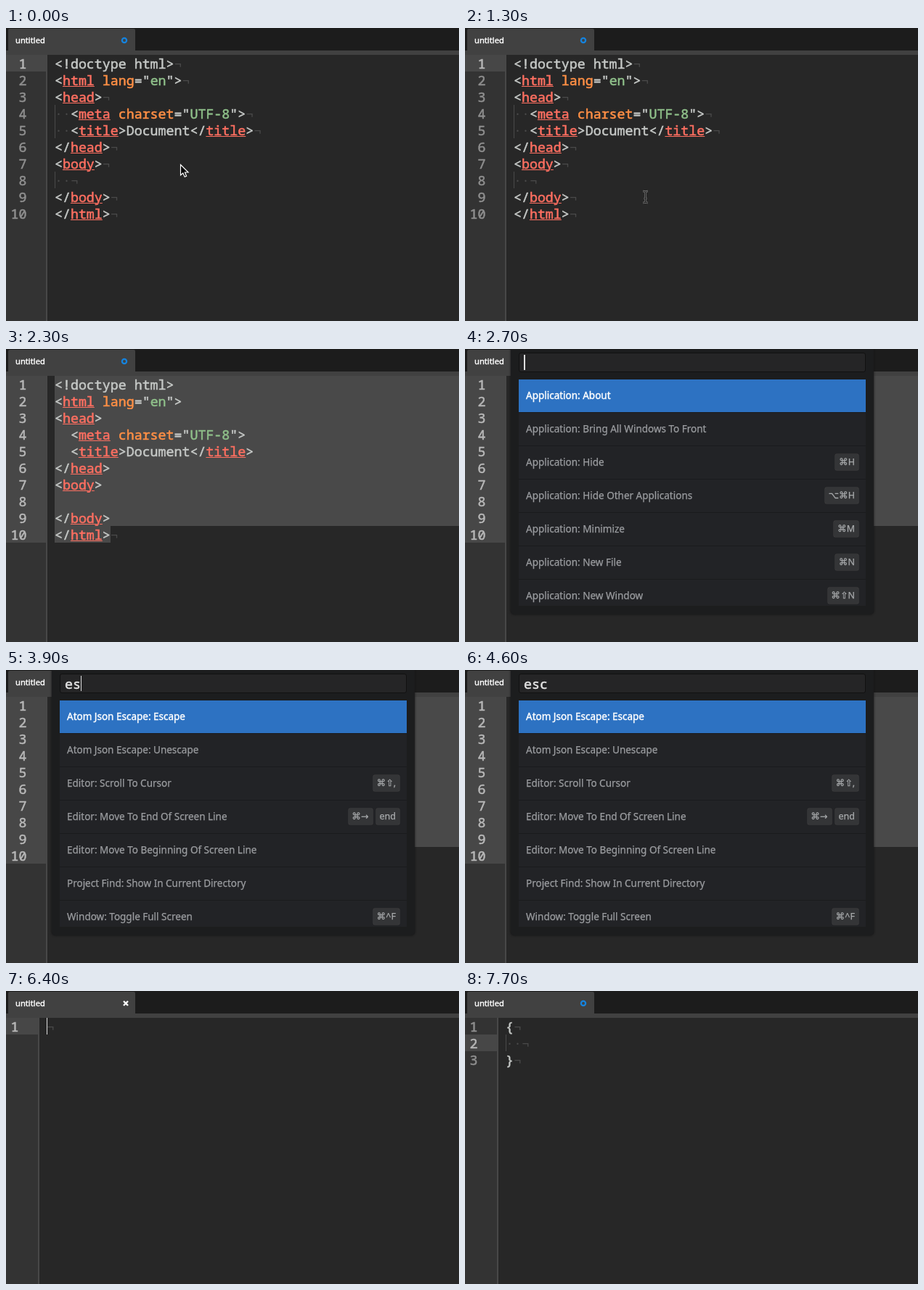
These frames come from a looping animation (624 by 404 pixels, 8 s). An HTML page:

```html
<!DOCTYPE html>
<html lang="en">
<head>
<meta charset="UTF-8">
<title>Editor</title>
<style>
html, body { margin: 0; width: 100%; height: 100%; overflow: hidden; }
#stage { position: relative; width: 624px; height: 404px; overflow: hidden; background: #272727;
  color: #c5c8c6; font: 18.3px/23px "Noto Sans Mono", monospace; -webkit-text-stroke: .55px; white-space: pre; }
#stage div, #stage svg { position: absolute; box-sizing: border-box; }
.bar { width: 624px; height: 37px; background: #1c1c1c; border-bottom: 6px solid #414141; }
.tab { left: 3px; top: 1px; width: 175px; height: 31px; border-radius: 2px 2px 0 0; background: #414141;
  color: #fff; font: 11.2px/31px "Noto Sans", sans-serif; -webkit-text-stroke: .4px; padding-left: 10px; }
.gutter { left: 0; top: 37px; bottom: 0; background: #333; border-right: 2px solid #484848; color: #8f8f8f; }
.num { left: 0; right: 0; height: 23px; padding-right: 26.5px; text-align: right; }
.active { background: #474747; color: #b8b8b8; }
.lines { top: 37px; right: 0; bottom: 0; }
.row { left: 0; right: 0; height: 23px; }
.sel { background: #494949; }
.row span { display: inline-block; height: 23px; }
.hint { color: #4a4a4a; -webkit-text-stroke: 0; }
.guide { border-left: 1px solid #4a4a4a; height: 23px; }
.caret { width: 1px; height: 23px; background: #ddd; }
b, i { font-weight: 400; font-style: normal; }
b { color: #fd6f61; text-decoration: underline 1.3px; text-underline-offset: 1px; }
.attr { color: #ff8f45; }
.str { color: #8fc08a; }
.thumb { left: 412px; top: 399px; width: 212px; height: 5px; border-radius: 3px 0 0 0; background: #686868; }
.palette { left: 63px; top: -10px; width: 500px; height: 376px; border-radius: 5px; background: #1c1d1e;
  box-shadow: 0 0 3px #111; }
.input { left: 11px; top: 15px; width: 478px; height: 27px; border: 1px solid #111; border-radius: 3px;
  background: #252526; color: #e4e4e4; padding-left: 6px; line-height: 26px; }
.input .caret { top: 2px; height: 21px; width: 1.5px; margin-left: 6px; }
.list { left: 11px; top: 52px; width: 478px; height: 312px; overflow: hidden; background: #222326;
  color: #9b9da0; font: 13.5px/45px "Noto Sans", sans-serif; -webkit-text-stroke: .25px; }
.item { left: 0; width: 478px; height: 46px; padding-left: 10px; border-bottom: 1px solid #1a1b1d; }
.item:first-child { background: #2d72c2; color: #fff; -webkit-text-stroke: .4px; }
.keys { right: 10px; top: 11px; display: flex; gap: 5px; }
kbd { height: 22px; padding: 0 5px; border-radius: 2px; background: #343537; color: #a9abad;
  box-shadow: 0 0 0 .5px #444; font: 12.5px/22px "Noto Sans", "DejaVu Sans", sans-serif; }
</style>
</head>
<body>
<div id="stage"></div>
<script>
const stage = document.getElementById("stage");
const LOOP = 8000;
const page = ["<!doctype html>", '<html lang="en">', "<head>", '  <meta charset="UTF-8">',
  "  <title>Document</title>", "</head>", "<body>", "  ", "</body>", "</html>"];
const escaped = page.join("\\n").replace(/"/g, '\\"');

// Each command is a title, followed by its key bindings.
const allCommands = [["Application: About"], ["Application: Bring All Windows To Front"],
  ["Application: Hide", "⌘H"], ["Application: Hide Other Applications", "⌥⌘H"],
  ["Application: Minimize", "⌘M"], ["Application: New File", "⌘N"], ["Application: New Window", "⌘⇧N"]];
const foundCommands = [["Atom Json Escape: Escape"], ["Atom Json Escape: Unescape"],
  ["Editor: Scroll To Cursor", "⌘⇧,"], ["Editor: Move To End Of Screen Line", "⌘→", "end"],
  ["Editor: Move To Beginning Of Screen Line"], ["Project Find: Show In Current Directory"],
  ["Window: Toggle Full Screen", "⌘^F"]];

const within = (t, ...spans) => spans.some(([from, to]) => t >= from && t < to);
const div = (cls, body = "", style = "") => `<div class="${cls}" style="${style}">${body}</div>`;
const caret = col => div("caret", "", `left:${col}ch`);
const hint = text => `<i class="hint">${text}</i>`;

function highlight(text) {
  return text.replace(/(<\/?)([a-z]+)|([a-z]+)(?==)|"([^"\\]+)(\\?")|</g,
    (all, open, tag, attr, str, close) =>
      tag ? open.replace("<", "&lt;") + `<b>${tag}</b>` :
      attr ? `<i class="attr">${attr}</i>` :
      str ? `"<i class="str">${str}</i>${close}` : "&lt;");
}

function row(text, index, selected, last) {
  const top = `top:${index * 23}px`;
  if (selected) {
    const code = highlight(text);
    return last ? div("row", `<span class="sel">${code}</span>${hint("¬")}`, top) : div("row sel", code, top);
  }
  const indent = text.match(/^ */)[0].length;
  const guide = indent ? div("guide") : "";
  return div("row", guide + hint("·".repeat(indent)) + highlight(text.slice(indent)) + hint("¬"), top);
}

function editor({ lines, current = 0, selected = false, caretAt = -1, scrolled = false }) {
  const edge = lines.length > 9 ? 57 : 46;
  const numbers = lines.map((_, i) =>
    div("num" + (selected || i === current ? " active" : ""), i + 1, `top:${i * 23}px`)).join("");
  const rows = scrolled
    ? div("row", `<span class="sel">${highlight(lines[0])}</span>${hint("¬")}`, "left:auto;right:5px")
    : lines.map((line, i) => row(line, i, selected, i === lines.length - 1)).join("");
  const cursor = caretAt < 0 ? "" : div("row", caret(caretAt), `top:${current * 23}px`);
  return div("lines", rows + cursor, `left:${edge + 10}px`) + div("gutter", numbers, `width:${edge}px`);
}

function tabBar(modified) {
  const icon = modified
    ? '<circle cx="163" cy="17" r="3.1" fill="none" stroke="#1583de" stroke-width="2.3"/>'
    : '<path d="M162 14l6 6m0-6l-6 6" stroke="#fff" stroke-width="2.4"/>';
  return div("bar") + div("tab", "untitled") + `<svg width="180" height="37">${icon}</svg>`;
}

function palette(query, commands, caretOn) {
  const items = commands.map(([title, ...keys], i) =>
    div("item", title + div("keys", keys.map(key => `<kbd>${key}</kbd>`).join("")), `top:${i * 46}px`));
  return div("palette",
    div("input", query + (caretOn ? caret(query.length) : "")) + div("list", items.join("")));
}

// Stops are [time, x, y], joined by eased moves.
const path = [[0, 240, 188], [100, 240, 188], [500, 221, 186], [700, 221, 186],
  [800, 218, 182], [1000, 218, 182], [1300, 248.5, 233], [1600, 248.5, 233]];

function pointer(t) {
  const next = path.findIndex(stop => stop[0] > t);
  const [t0, x0, y0] = path[next - 1], [t1, x1, y1] = path[next];
  const p = (t - t0) / (t1 - t0), ease = p * p * (3 - 2 * p);
  const x = x0 + (x1 - x0) * ease, y = y0 + (y1 - y0) * ease;
  const beam = "M-3.5-8Q0-8 0-6Q0-8 3.5-8M0-6V6M-3.5 8Q0 8 0 6Q0 8 3.5 8M-2 2H2";
  const shape = t < 200
    ? '<path d="M.5 .5V15L3.8 12L6.2 17.2L8.6 16.2L6.4 11H11Z" fill="#000" stroke="#fff" stroke-width="1.2"/>'
    : `<path d="${beam}" fill="none" stroke="#888" stroke-width="2.4"/>
       <path d="${beam}" fill="none" stroke="#222" stroke-width="1.2"/>`;
  return `<svg width="624" height="404"><g transform="translate(${x} ${y})">${shape}</g></svg>`;
}

function scene(t) {
  if (t < 1600) {
    const blink = within(t, [100, 400], [800, 1200]);
    return editor({ lines: page, caretAt: blink ? 0 : -1 }) + tabBar(true) + pointer(t);
  }
  if (t < 4700) {
    const typed = "esc".slice(0, t < 3600 ? 0 : Math.min(3, 1 + Math.floor((t - 3600) / 200)));
    const commands = typed.length < 2 ? allCommands : foundCommands;
    const open = t >= 2700
      ? palette(typed, commands, within(t, [2700, 3200], [3600, 4400])) : "";
    return editor({ lines: page, selected: true }) + tabBar(true) + open;
  }
  if (t < 5800)
    return editor({ lines: [escaped], scrolled: true }) + tabBar(true) + (t < 5400 ? div("thumb") : "");
  if (t < 6600)
    return editor({ lines: [""], caretAt: within(t, [5800, 6100], [6400, 6600]) ? 0 : -1 }) + tabBar(t < 6000);
  if (t < 6800)
    return editor({ lines: ["{}"], caretAt: 1 }) + tabBar(false);
  return editor({ lines: ["{", "  ", "}"], current: 1, caretAt: t < 7200 ? 2 : -1 }) + tabBar(t >= 7200);
}

let shown = "";
function draw(now) {
  const html = scene(now % LOOP);
  if (html !== shown) stage.innerHTML = shown = html;
  requestAnimationFrame(draw);
}
draw(performance.now());
</script>
</body>
</html>
```
